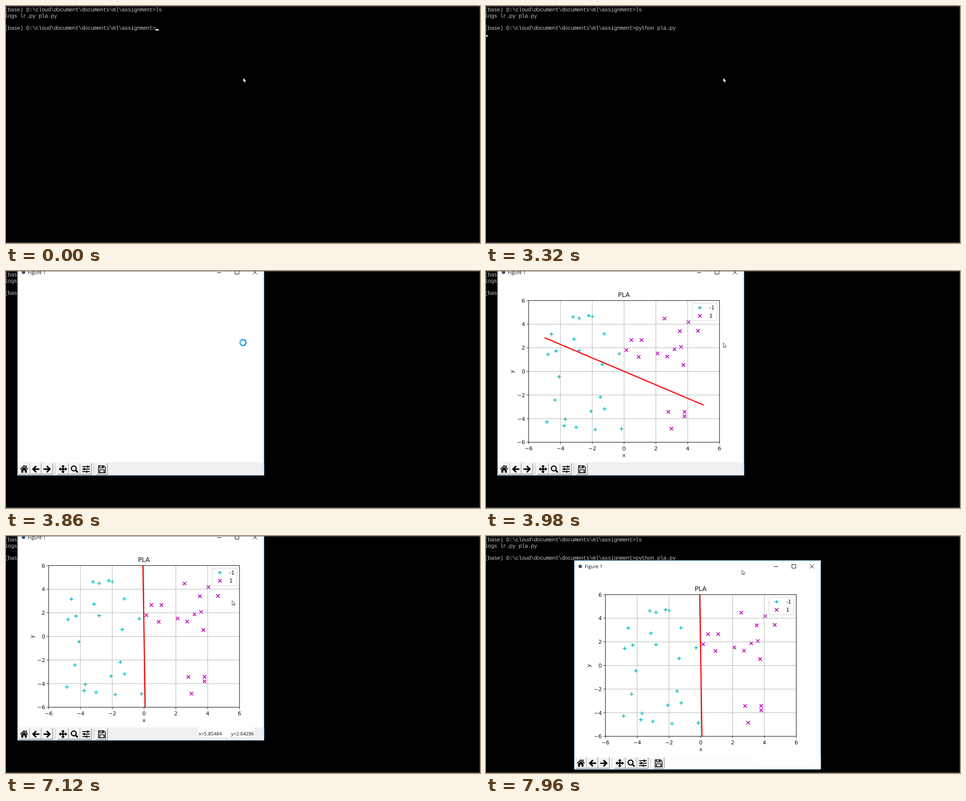
Recreate the animation shown at these times as an HTML page. Size 1056 by 530 pixels, loop 8 s.

```html
<!DOCTYPE html>
<html lang="en">
<head>
<meta charset="utf-8">
<title>Perceptron demo</title>
<style>
html, body { margin: 0; width: 100%; height: 100%; overflow: hidden; background: #000; }
svg { display: block; width: 1056px; height: 530px; text-rendering: geometricPrecision; }
.term { font: 12.5px "Liberation Mono", monospace; letter-spacing: -.64px; fill: #bdbdbd; white-space: pre; }
.plot { font: 11.9px "DejaVu Sans", sans-serif; fill: #111; }
.ui { font: 10.7px "Open Sans", "Noto Sans", sans-serif; fill: #111; }
.mid { text-anchor: middle; }
.end { text-anchor: end; }
.line { fill: none; stroke: #000; }
</style>
</head>
<body>
<svg viewBox="0 0 1056 530">
  <defs>
    <clipPath id="axes"><rect x="95" y="66" width="425.4" height="317"/></clipPath>
  </defs>
  <rect width="1056" height="530"/>
  <g class="term">
    <text x="-3.1" y="12">(base) D:\cloud\document\documents\ml\assignment&gt;ls</text>
    <text x="-3.1" y="25.6">logs  lr.py  pla.py</text>
    <text id="prompt" x="-3.1" y="52.8"></text>
  </g>
  <rect id="caret" width="6.9" height="3.2" fill="#fff"/>

  <g id="win">
    <rect x="25.5" y="-10.5" width="549.5" height="467.5" fill="#fff" stroke="#2474b0"/>
    <circle cx="39" cy="3" r="3.8" fill="#34506a"/>
    <text class="ui" x="49" y="6.6">Figure 1</text>
    <path class="line" d="M470 3.5h9.5M510.5 -1.5h8.5v8.5h-8.5zM550.5 -1.5l9 9m0 -9l-9 9"/>
    <g id="toolbar"></g>
    <g id="chart"></g>
  </g>

  <path id="arrow" d="M0 0V10L2.4 7.9L4 11.2L5.5 10.5L4.1 7.3H7Z" fill="#fff" stroke="#222" stroke-width=".8"/>
  <g id="ring" fill="none" stroke-width="2.8">
    <circle cx="528" cy="160" r="6.6" stroke="#1f8df0"/>
    <path d="M523.3 164.7A6.6 6.6 0 0 1 524 154.8" stroke="#35c3f5"/>
  </g>
  <path d="M0 .5H1056" stroke="#666"/>
  <path d="M0 529.5H1056" stroke="#777"/>
  <path d="M1055.5 0V530" stroke="#444"/>
</svg>
<script>
const LOOP = 8000;
const CELL = 6.86;
const PROMPT = '(base) D:\\cloud\\document\\documents\\ml\\assignment>';
const COMMAND = 'python pla.py';
const $ = id => document.getElementById(id);
const px = x => 307.6 + 35.43 * x;
const py = y => 224.5 - 26.4 * y;

// Each row: start time, then the state that holds until the next row.
const typing = [ // characters typed, caret shown
  [0, 0, 1], [150, 0, 0], [550, 0, 1], [700, 1, 1], [970, 2, 1], [1100, 2, 0],
  [1400, 4, 1], [1520, 5, 1], [1660, 6, 1], [1785, 6, 0], [1910, 7, 1],
  [2060, 8, 1], [2180, 9, 1], [2490, 10, 1], [2640, 13, 1], [3170, 13, 0]
];
const slopes = [[0, -.571], [4540, -.965], [4940, -2.05], [5650, -84]];
const pointer = [
  [0, 528.5, 160.5], [7120, 503.8, 144.8], [7260, 476, 92], [7380, 440.5, 35.5],
  [7530, 414, 20], [7660, 399, 11], [7810, 455, 38], [7960, 570, 76]
];
const offsets = [[0, 0, 0], [7810, 56, 27], [7960, 171, 65]];
const readouts = [[0, '', ''], [7120, 'x=5.85484', 'y=2.64286'], [7260, 'x=4.75323', 'y=5.01948'], [7380, '', '']];
const at = (rows, t) => rows.filter(r => r[0] <= t).pop().slice(1);

const pluses = [
  194, 102.7, 207.7, 105.8, 229, 100, 237, 101.8, 145.8, 141, 196.3, 152.5,
  263.3, 140.4, 156, 179, 138, 186.6, 207.7, 178, 297, 184.8, 259, 209,
  163, 236.5, 153.4, 288.6, 254.7, 281.8, 264, 308.4, 234.2, 313.5, 135.7, 337.6,
  176.7, 331.6, 174.2, 346, 200.7, 349.6, 243.4, 354.6, 302, 352.8
];
const crosses = [
  397.8, 106.4, 450.8, 114.1, 432, 134.8, 472.3, 133.8, 323.8, 154.5, 346.3, 154.5,
  312.7, 177, 340.2, 192, 382.3, 184.5, 403.8, 191.4, 420, 175, 434.6, 170,
  439.7, 210.2, 406.3, 315, 442.3, 315, 442.3, 325, 413.2, 352.5
];
const plus = (x, y) => `M${x - 4.1} ${y}h8.2M${x} ${y - 4.1}v8.2`;
const cross = (x, y) => `M${x - 3.8} ${y - 3.8}l7.6 7.6m0 -7.6l-7.6 7.6`;
const marks = (list, shape) =>
  list.map((v, i) => i % 2 ? '' : shape(v, list[i + 1])).join('');
const stroke = (d, color, width) =>
  `<path d="${d}" fill="none" stroke="${color}" stroke-width="${width}"/>`;
const text = (x, y, s, cls = '') => `<text class="${cls}" x="${x}" y="${y}">${s}</text>`;

function buildChart() {
  let grid = '', ticks = '', labels = '';
  for (let v = -6; v <= 6; v += 2) {
    const x = px(v), y = py(v), name = String(v).replace('-', '\u2212');
    grid += `M${x} 66V383M95 ${y}H520`;
    ticks += `M${x} 383v4.2M95 ${y}h-4.2`;
    labels += text(x, 400.6, name, 'mid') + text(87, y + 4.4, name, 'end');
  }
  $('chart').innerHTML = `<g class="plot">
    ${stroke(marks(pluses, plus), '#00bfbf', 1.8)}
    ${stroke(marks(crosses, cross), '#bf00bf', 1.8)}
    ${stroke(grid, '#b0b0b0', 1)}
    <path id="fit" clip-path="url(#axes)" fill="none" stroke="#f00" stroke-width="2.5"/>
    ${stroke('M95 66H520.2V383H95Z' + ticks, '#111', 1)}
    ${labels}
    ${text(307.5, 416.2, 'x', 'mid')}
    <text class="mid" transform="translate(61.5 225) rotate(-90)">y</text>
    <text class="mid" x="307.3" y="58" font-size="14.3" style="font-size:14.3px">PLA</text>
    <rect x="459.5" y="72" width="55" height="39.2" rx="2.5" fill="#fff" fill-opacity=".8" stroke="#ccc"/>
    ${stroke(plus(476.3, 82), '#00bfbf', 1.8)}
    ${stroke(cross(476.5, 100.2), '#bf00bf', 1.8)}
    ${text(497.5, 86, '-1')}${text(497.5, 104.2, '1')}
  </g>`;
}

function buildToolbar() {
  const button = x => `<rect x="${x}" y="430" width="24" height="24.5" fill="#f4f4f4"/>
    ${stroke(`M${x} 454.5V430.5h24`, '#fff', 1)}${stroke(`M${x} 454.5h24.5V430`, '#8a8a8a', 1.3)}`;
  const head = a => `<path transform="rotate(${a} 127 443)" d="M127 433.5l4 4.5h-2.6v5h-2.8v-5h-2.6z"/>`;
  const back = 'l8 -8l2.4 2.4l-4 4h10v3.4h-10l4 4l-2.4 2.4z';
  $('toolbar').innerHTML = `
    <rect id="bar" x="26" y="428" width="548.6" height="27.5"/>
    <rect x="26" y="455.5" width="548.6" height="1.2" fill="#e4f1fb"/>
    ${[28.5, 54, 79.5, 115, 140.5, 166, 201.5].map(button).join('')}
    ${stroke('M109.5 431V454M196 431V454', '#bbb', 1)}
    <path d="M40.2 434.3L49 442.6L47.8 444L40.2 437L32.6 444L31.4 442.6ZM40.2 438.6L46.2 444V451H41.9V446H38.5V451H34.2V444ZM44 435h2.4v4l-2.4 -2.2z"/>
    <path d="M58 443${back}"/>
    <path transform="translate(158 0) scale(-1 1)" d="M58 443${back}"/>
    ${[0, 90, 180, 270].map(head).join('')}
    <circle class="line" cx="151" cy="441.5" r="5.4" stroke-width="2.5"/>
    ${stroke('M155 445.5L160 450.5', '#000', 3.2)}
    ${stroke('M170 437.5h17M170 443h17M170 448.5h17', '#000', 1.8)}
    <path d="M180.5 435h3v5h-3zM173 440.5h3v5h-3zM178 446h3v5h-3z"/>
    ${stroke('M206 435.5h12l3.3 3.3v12h-15.3zM209 435.5v5h8v-5M209 450.5v-6h9.5v6', '#000', 1.7)}
    <path d="M213.5 436h2.5v3.4h-2.5z"/>
    <rect id="strip" x="429" y="428.5" width="125" height="20.5" fill="#fff"/>
    <text id="readX" class="ui" x="429.6" y="445.8"></text>
    <text id="readY" class="ui" x="501.6" y="445.8"></text>`;
}

const set = (id, attrs) => {
  for (const k in attrs) $(id).setAttribute(k, attrs[k]);
};
const show = (id, on) => set(id, { display: on ? 'inline' : 'none' });

function render(t) {
  const [count, lit] = at(typing, t);
  $('prompt').textContent = PROMPT + COMMAND.slice(0, count);
  const entered = t >= 3320;
  set('caret', {
    x: entered ? -3.1 : 333 + count * CELL,
    y: entered ? 65.2 : 51.5
  });
  show('caret', entered ? t < 3740 : lit);

  const opening = t < 3860;
  const [dx, dy] = at(offsets, t);
  show('win', t >= 3740);
  set('win', {
    transform: opening ? 'translate(7 4.6) scale(.96)' : `translate(${dx} ${dy})`,
    opacity: opening ? .17 : 1
  });
  show('toolbar', !opening);
  show('chart', t >= 3980);
  set('bar', { fill: t < 7810 ? '#f0f0f0' : '#fdfdfd' });
  show('strip', t >= 7120);

  const [slope] = at(slopes, t);
  set('fit', { d: `M${px(-5)} ${py(-5 * slope)}L${px(5)} ${py(5 * slope)}` });

  const [rx, ry] = at(readouts, t);
  $('readX').textContent = rx;
  $('readY').textContent = ry;

  const busy = t >= 3740 && t < 3980;
  const [mx, my] = at(pointer, t);
  show('ring', busy);
  show('arrow', !busy);
  set('arrow', { transform: `translate(${mx} ${my})` });
}

buildChart();
buildToolbar();
const start = performance.now();
function frame() {
  render((performance.now() - start) % LOOP);
  requestAnimationFrame(frame);
}
frame();
</script>
</body>
</html>
```
